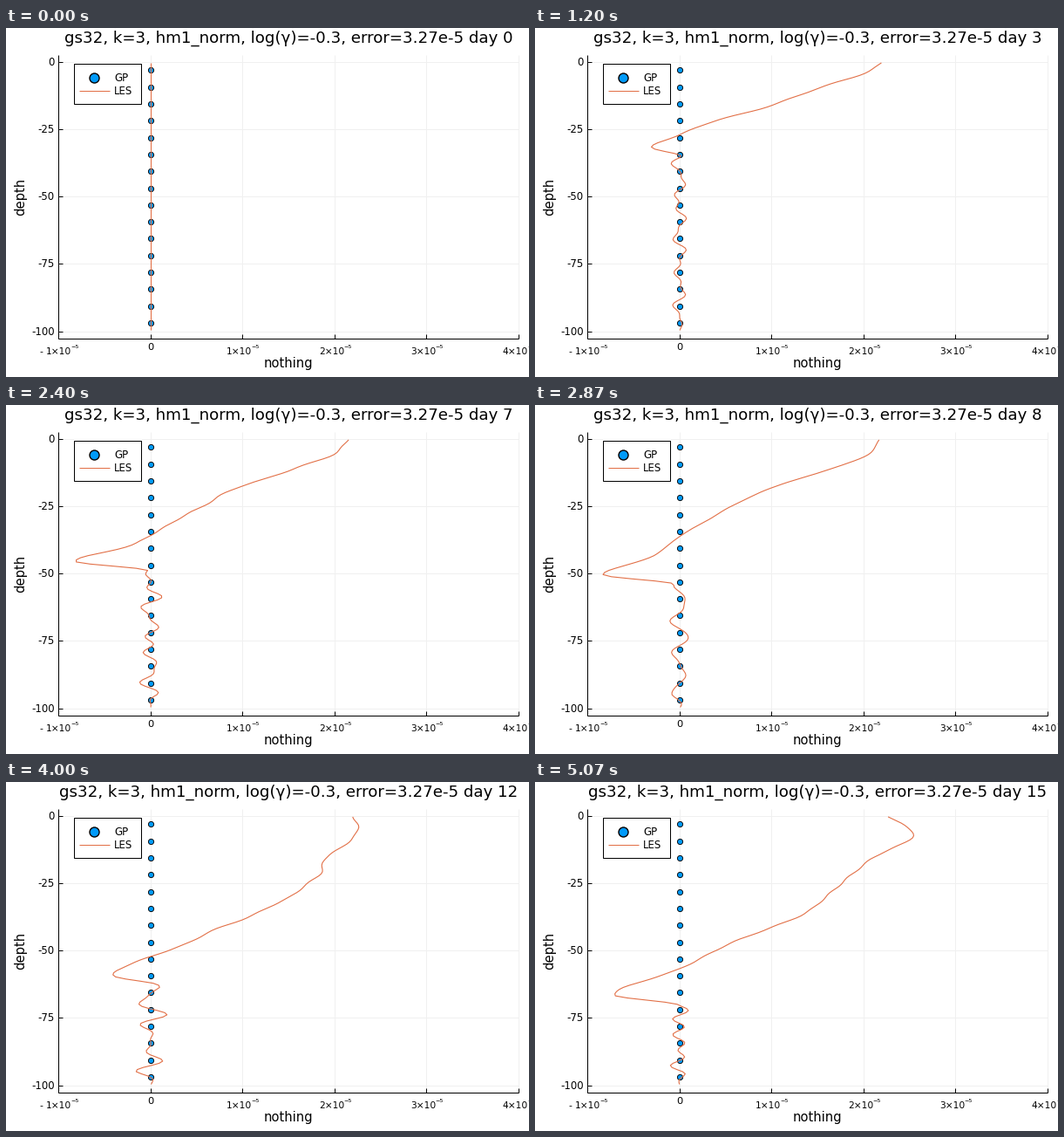
A matplotlib script for the animation above (5.14 s loop, 600 by 400 pixels).

```python
import numpy as np
import matplotlib.pyplot as plt
from matplotlib.animation import FuncAnimation

W, H, DPI = 600, 400, 100
FRAMES, LOOP = 77, 5140
LEFT, RIGHT, TOP, BOTTOM = 60.3, 588, 31, 356
ZERO, UNIT = 165.8, 105.5        # pixels: x of 0 and width of 1e-5
SURFACE, METRE = 38.7, 3.09      # pixels: y of depth 0 and height of 1 m
BLUE, ORANGE, GRID = "#009AFA", "#E26F46", "#F0F0F0"

plt.rcParams["font.family"] = "DejaVu Sans"


def pt(px):
    return px * 72 / DPI


def depth_y(depth):
    return SURFACE - METRE * depth


def smooth(y, ys, xs):
    """Monotone cubic through the points (xs over ys)."""
    h = np.diff(ys)
    d = np.diff(xs) / h
    m = np.zeros(len(xs))
    m[0], m[-1] = d[0], d[-1]
    a, b = d[:-1], d[1:]
    same = a * b > 0
    m[1:-1][same] = 2 * a[same] * b[same] / (a + b)[same]
    k = np.clip(np.searchsorted(ys, y) - 1, 0, len(h) - 1)
    t = (y - ys[k]) / h[k]
    return ((1 + 2 * t) * (1 - t) ** 2 * xs[k] + t * (1 - t) ** 2 * h[k] * m[k]
            + t * t * (3 - 2 * t) * xs[k + 1] + t * t * (t - 1) * h[k] * m[k + 1])


# flux (1e-6) from the surface to the foot of the mixed layer, by time step
LAYER = np.array([0, 0.1, 0.25, 0.4, 0.55, 0.7, 0.85, 1])
FLUX = {
    10: (21.9, 20.3, 16.0, 11.7, 7.8, 4.3, 0.6, -3.5),
    26: (22.4, 21.4, 17.6, 14.7, 9.7, 2.9, -0.3, -2.5),
    36: (21.5, 20.2, 15.4, 8.7, 5.3, 1.7, -1.4, -8.8),
    49: (22.4, 21.2, 15.1, 8.1, 3.7, -0.9, -3.2, -7.9),
    60: (22.2, 22.6, 19.9, 18.7, 14.8, 8.7, 2.3, -3.7),
    76: (22.6, 25.6, 20.6, 17.0, 13.3, 5.8, 0.0, -7.3),
}
CELLS = depth_y(-(np.arange(128) + 0.5) * 100 / 128)
FLOOR = depth_y(-100)


def ripple(step, foot):
    """Seeded waves: faint in the mixed layer, growing with time below it."""
    rng = np.random.default_rng(step)
    waves = sum(rng.normal() * np.sin(2 * np.pi * CELLS / length + rng.uniform(0, 7))
                for length in (18, 27, 41))
    size = np.interp(CELLS, [foot - 8, foot, foot + 14, FLOOR - 15, FLOOR],
                     [1, 0, 0.7 * step ** 0.5, 0.6 * step ** 0.5, 0])
    return size * waves


def profile(step):
    """x of the flux curve at every cell; the layer deepens with sqrt(time)."""
    if step == 0:
        return np.full_like(CELLS, ZERO)
    depth = 23.75 * step ** 0.5
    foot = SURFACE + depth
    flux = [np.interp(step, list(FLUX), column) for column in zip(*FLUX.values())]
    ys = np.append(SURFACE + depth * LAYER, [foot + 11, FLOOR])
    xs = ZERO + UNIT / 10 * np.append(flux, [0, 0])
    return smooth(CELLS, ys, xs) + ripple(step, foot)


fig = plt.figure(figsize=(W / DPI, H / DPI), dpi=DPI, facecolor="white")
ax = fig.add_axes([0, 0, 1, 1])
ax.set_xlim(0, W)
ax.set_ylim(H, 0)
ax.axis("off")


def stroke(x, y, color="black", width=1, z=1):
    return ax.plot(x, y, color=color, lw=pt(width), zorder=z,
                   solid_capstyle="butt")[0]


def label(x, y, text, px, ha="left", **kw):
    return ax.text(x, y, text, fontsize=pt(px), ha=ha,
                   **{"va": "baseline", "zorder": 8, **kw})


def dots(x, y, size, edge, z):
    ax.plot(x, y, "o", ms=pt(size), mfc=BLUE, mec="black", mew=pt(edge),
            zorder=z, snap=False)


def power_label(x, n):
    """Scientific tick label such as 2×10 with a raised -5."""
    start = x - 18
    if n < 0:
        start += 4
        label(start - 7.5, 374, "-", 10.8)
    label(start, 374, f"{abs(n)}×10", 10.6)
    label(start + 28.5, 367, "−5", 6.4)


for n in range(-1, 5):
    x = ZERO + n * UNIT
    if n >= 0:
        stroke([x, x], [TOP, BOTTOM], GRID, z=0)
    stroke([x, x], [BOTTOM, BOTTOM - 5])
    if n:
        power_label(x, n)
    else:
        label(x, 369, "0", 11.5, "center")

for depth in range(0, -101, -25):
    y = depth_y(depth)
    stroke([LEFT, RIGHT], [y, y], GRID, z=0)
    stroke([LEFT, LEFT + 5], [y, y])
    label(55.5, y + 4, str(depth), 11.7, "right")

stroke([LEFT, LEFT], [TOP, BOTTOM])
stroke([LEFT, RIGHT], [BOTTOM, BOTTOM])
label(324, 389, "nothing", 14.7, "center")
label(23.7, 193, "depth", 14.7, "right", va="center", rotation=90)

levels = depth_y(-(np.arange(16) + 0.5) * 6.25)
dots(np.full(16, ZERO), levels, 6.2, 0.9, 3)
curve = stroke([], [], ORANGE, 1.1, 4)

ax.add_patch(plt.Rectangle((78, 41), 77.3, 46, fc="white", ec="black",
                           lw=pt(1), zorder=5))
dots([101.2], [56.7], 11, 1.4, 6)
stroke([84, 119], [72, 72], ORANGE, 1, 6)
label(124, 61, "GP", 11.7)
label(124, 76.4, "LES", 11.7)
title = label(324.5, 17.2, "", 18.25, "center")


def draw(step):
    day = step * 5 // 24
    title.set_text(f"gs32, k=3, hm1_norm, log(γ)=-0.3, error=3.27e-5 day {day}")
    curve.set_data(profile(step), CELLS)
    return curve, title


anim = FuncAnimation(fig, draw, frames=FRAMES, interval=LOOP / FRAMES,
                     repeat=True, repeat_delay=0, blit=False)
plt.show()
```
